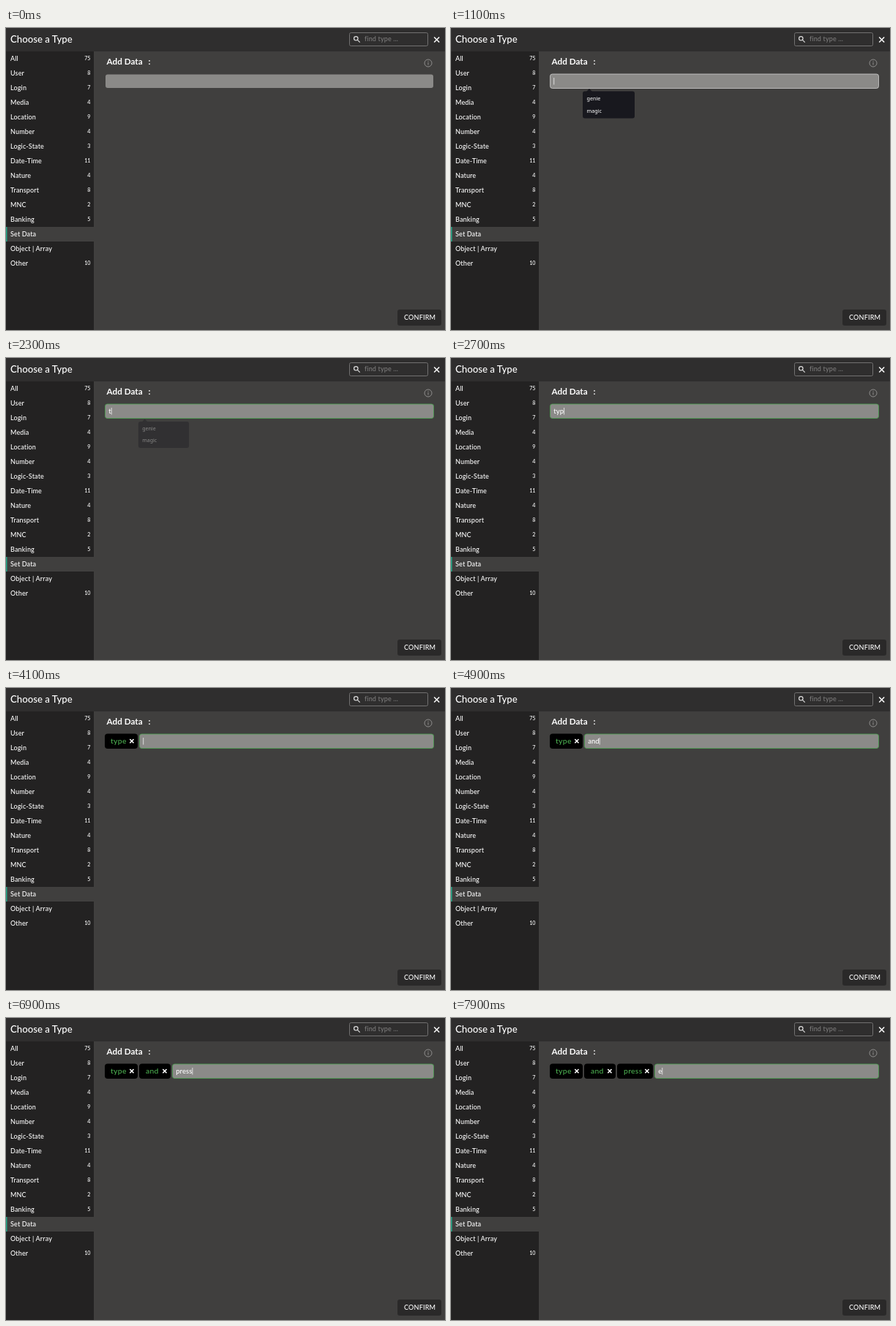
An HTML page for the animation above (8000 ms loop, 600 by 413 pixels).

```html
<!DOCTYPE html>
<html lang="en">
<head>
<meta charset="utf-8">
<title>Choose a Type</title>
<style>
  html, body { margin: 0; width: 100%; height: 100%; overflow: hidden; background: #403f3e; }
  svg { display: block; width: 100%; height: 100%; }
  text { font: 500 9px Lato, sans-serif; letter-spacing: .15px; fill: #fff; white-space: pre; }
  .icon { fill: none; stroke: #ddd; stroke-width: 1.2; }
  #menu .count { font-size: 7.2px; text-anchor: end; letter-spacing: 0; }
  #popup text { font: 7.2px "Noto Sans", sans-serif; letter-spacing: 0; }
  #typed { font-size: 9.4px; letter-spacing: .1px; }
  #field { stroke-width: .8; }
  .chip text { font-size: 10.4px; letter-spacing: .3px; fill: #4caf50; }
  .chip path { stroke: #fff; stroke-width: 1.6; }
</style>
</head>
<body>
<svg viewBox="0 0 600 413">
  <rect width="600" height="413" fill="#403f3e"/>
  <rect width="600" height="32" fill="#2f2e2e"/>
  <rect y="32" width="120" height="381" fill="#232222"/>
  <rect y="272" width="120" height="20" fill="#403f3e"/>
  <rect y="272" width="1.5" height="20" fill="#22a384"/>
  <text x="6" y="19.7" style="font-size:13.2px;letter-spacing:0">Choose a Type</text>
  <rect x="469.5" y="6.5" width="107" height="18" rx="2" fill="none" stroke="#727171"/>
  <g class="icon">
    <circle cx="478.3" cy="14.3" r="2.7"/>
    <path d="M480.4 16.4l3.3 3.3"/>
    <path d="M585.2 12.5l7 7m0-7l-7 7" stroke="#fff" stroke-width="1.5"/>
    <g stroke="#8e8d8c" stroke-width="1">
      <circle cx="577" cy="48" r="5"/>
      <path d="M577 47v3.6M577 45v1.1"/>
    </g>
  </g>
  <text x="490" y="18.3" style="fill:#7c7b7b">find type ...</text>
  <g id="menu"></g>
  <text x="137.6" y="50" style="font-size:11.7px;font-weight:700;letter-spacing:0">Add Data<tspan x="194.5">:</tspan></text>
  <rect x="535" y="385" width="60" height="22" rx="3" fill="#2a2929"/>
  <text x="544" y="398.8" style="font-size:9.1px">CONFIRM</text>
  <g id="chips"></g>
  <rect id="field" rx="3" fill="#8b8a88"/>
  <text id="typed" y="76"></text>
  <rect id="caret" y="68" width="1" height="9.5" fill="#dcdcdc"/>
  <g id="popup">
    <path d="M185 87l4-4 4 4z" fill="#18181e"/>
    <rect x="180" y="86.5" width="71" height="37" rx="3" fill="#18181e"/>
    <text x="185.5" y="99.2">genie</text>
    <text x="185.5" y="115.5">magic</text>
  </g>
</svg>
<script>
const LOOP = 8000, FOCUS = 1100, BLINK = 500, FADE = 160, RIGHT = 584.5;
const $ = id => document.getElementById(id);
const set = (el, attrs) => { for (const k in attrs) el.setAttribute(k, attrs[k]); };

const menu = [['All', 75], ['User', 8], ['Login', 7], ['Media', 4], ['Location', 9],
  ['Number', 4], ['Logic-State', 3], ['Date-Time', 11], ['Nature', 4], ['Transport', 8],
  ['MNC', 2], ['Banking', 5], ['Set Data', ''], ['Object | Array', ''], ['Other', 10]];
$('menu').innerHTML = menu.map(([name, n], i) =>
  `<text x="6" y="${44.8 + 20 * i}">${name}</text>` +
  `<text class="count" x="115.5" y="${44.3 + 20 * i}">${n}</text>`).join('');

// Each word: left edge, chip width, key times, time it becomes a chip
const words = [
  { text: 'type', x: 135, w: 45, keys: [2200, 2500, 2700, 3100], done: 3700 },
  { text: 'and', x: 182, w: 43, keys: [4300, 4600, 4900], done: 5100 },
  { text: 'press', x: 227, w: 49, keys: [6100, 6200, 6400, 6700, 6800], done: 7100 },
  { text: 'e', x: 278, w: 0, keys: [7900], done: Infinity }
];
$('chips').innerHTML = words.filter(({ w }) => w).map(({ text, x, w }, i) => `<g class="chip">
  <rect x="${x}" y="62.6" width="${w}" height="20.3" rx="4"/>
  <text x="${x + (i ? 9 : 8)}" y="76">${text}</text>
  <path d="M${x + w - 10.7} 70l5.2 5.2m0-5.2l-5.2 5.2"/></g>`).join('');
const chips = [...document.querySelectorAll('.chip')];
const keys = words.flatMap(w => w.keys), firstKey = keys[0];

function draw(t) {
  const word = words.find(w => t < w.done);
  const focused = t >= FOCUS, started = t >= firstKey;
  chips.forEach((chip, i) => set(chip, { visibility: t >= words[i].done ? 'visible' : 'hidden' }));

  const left = word.x + .5, edge = focused ? 0 : .5;
  set($('field'), {
    x: left + edge, y: 63 + edge, width: RIGHT - left - 2 * edge, height: 19.5 - 2 * edge,
    stroke: started ? '#4aa44e' : focused ? '#cfcfcf' : 'none'
  });

  const typed = $('typed'), start = word.x + 5.2;
  typed.textContent = word.text.slice(0, word.keys.filter(k => t >= k).length);
  set(typed, { x: start });
  const lastKey = Math.max(FOCUS, ...keys.filter(k => t >= k));
  const lit = focused && Math.floor((t - lastKey) / BLINK) % 2 === 0;
  const width = typed.textContent ? typed.getComputedTextLength() : 0;
  set($('caret'), { x: start + width, visibility: lit ? 'visible' : 'hidden' });

  const gone = Math.min(1, Math.max(0, (t - firstKey) / FADE)), scale = 1 - .04 * gone;
  set($('popup'), {
    opacity: focused ? 1 - gone : 0,
    transform: `translate(215.5 105) scale(${scale}) translate(-215.5 -105)`
  });
}

const begin = performance.now();
function tick() {
  draw((performance.now() - begin) % LOOP);
  requestAnimationFrame(tick);
}
tick();
</script>
</body>
</html>
```
